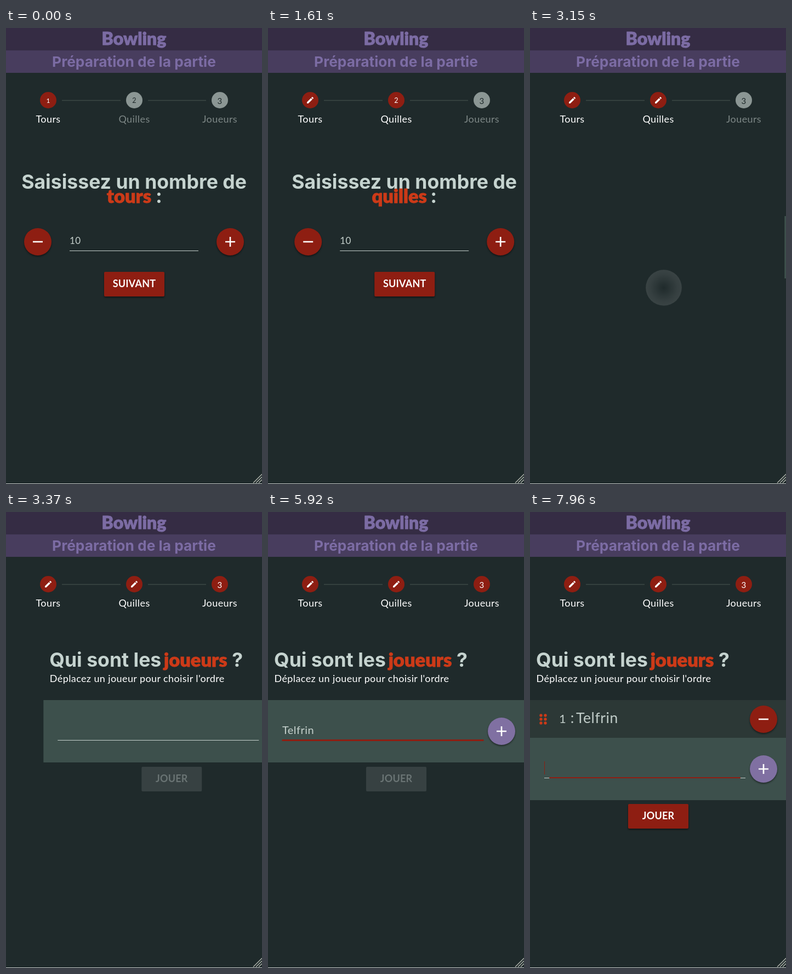
Recreate the animation shown at these times as an HTML page. Size 467x834 px, loop 8 s.

```html
<!DOCTYPE html>
<html lang="fr">
<head>
<meta charset="utf-8">
<title>Bowling</title>
<style>
  html, body { margin: 0; height: 100%; overflow: hidden; background: #1f2a2b; }
  svg { display: block; width: 100%; height: 100%; }
  text { font: 18px Lato, "Open Sans", sans-serif; letter-spacing: .022em; fill: #fff; white-space: pre; }
  .mid { text-anchor: middle; }
  .sub, .head { font-family: Inter, "Open Sans", sans-serif; font-weight: 700; letter-spacing: 0; }
  .sub { font-size: 26.3px; fill: #7c6ca4; }
  .head { font-size: 35.6px; fill: #c5d3cf; }
  .fun { font-size: 34.5px; font-weight: 900; letter-spacing: 0; fill: #cc3a18; stroke: #cc3a18; stroke-width: .8; }
  .title { font-size: 32px; fill: #7c6ca4; stroke: #7c6ca4; }
  .field { font-size: 20px; fill: #c5d0cc; }
  .count { font-size: 17px; fill: #c5d0cc; }
  .item { font-size: 26.5px; fill: #c0ccc8; }
  .btn { font-weight: 700; letter-spacing: .01em; }
  .raised { filter: drop-shadow(0 2px 1.5px #0007); }
</style>
</head>
<body>
<svg viewBox="0 0 467 834" preserveAspectRatio="none">
  <defs>
    <radialGradient id="glow">
      <stop offset="0" stop-color="#fff" stop-opacity="0"/>
      <stop offset=".75" stop-color="#fff" stop-opacity=".1"/>
      <stop offset="1" stop-color="#fff" stop-opacity=".12"/>
    </radialGradient>
  </defs>
  <rect width="467" height="834" fill="#1f2a2b"/>
  <g id="pages"></g>
  <rect width="467" height="41" fill="#352c44"/>
  <rect y="41" width="467" height="41" fill="#483d5e"/>
  <text class="fun title mid" x="233.5" y="30.5">Bowling</text>
  <text class="sub mid" x="233.5" y="71">Préparation de la partie</text>
  <path d="M102 132.5H209M259 132.5H365" stroke="#3c4746" stroke-width="1.5"/>
  <g id="steps"></g>
  <path d="M451 832L467 816M456 832L467 821M461 832L467 826" stroke="#b4b8b0" stroke-width="1.4"/>
  <rect y="833" width="467" height="1" fill="#c8cbcb"/>
  <circle id="touch" fill="url(#glow)"/>
</svg>
<script>
const RED = '#8e1e12', PURPLE = '#8070a2', NAME = 'Telfrin';
const $ = id => document.getElementById(id);
const set = (el, attrs) => { for (const k in attrs) el.setAttribute(k, attrs[k]); };
const show = (el, on) => { el.style.display = on ? '' : 'none'; };

const text = (cls, x, y, str, extra = '') => `<text class="${cls}" x="${x}" y="${y}" ${extra}>${str}</text>`;
const fab = (x, y, color, plus) => `<g transform="translate(${x} ${y})">
  <circle class="raised" r="25" fill="${color}"/>
  <path d="M-9 0H9${plus ? 'M0-9V9' : ''}" stroke="#fff" stroke-width="2.6"/></g>`;
const button = (y, label, id) => `<g id="${id}" transform="translate(179 ${y})">
  <rect class="raised" width="110" height="45" rx="2" fill="${RED}"/>
  ${text('btn mid', 55, 28, label)}</g>`;

const counterPage = (n, word, colonX) => `<g id="page${n}">
  ${text('head mid', 233.5, 294, 'Saisissez un nombre de')}
  ${text('fun mid', 224.5, 320, word)}${text('head mid', colonX, 320, ':')}
  ${fab(58, 391, RED)}${fab(409, 391, RED, true)}
  ${text('count', 116, 395, '10', `id="count${n}"`)}
  <rect x="116" y="407" width="235" height="1" fill="#c5d0cc"/>
  ${button(446, 'SUIVANT', 'next' + n)}</g>`;

const dots = [372, 379, 386].map(y =>
  `<circle cx="20" cy="${y}" r="2.7"/><circle cx="28" cy="${y}" r="2.7"/>`).join('');

const playersPage = `<g id="page3">
  ${text('head', 11, 283, 'Qui sont les')}${text('fun mid', 277.5, 283, 'joueurs')}
  ${text('head mid', 354, 283, '?')}
  ${text('', 11.5, 311, "Déplacez un joueur pour choisir l'ordre")}
  <g id="item">
    <rect y="344" width="467" height="69" fill="#2c3836"/>
    <g fill="#cc3a18">${dots}</g>
    ${text('item', 53, 386, '<tspan font-size="22">1</tspan> :')}${text('item', 84, 386, NAME)}
    ${fab(426, 379, RED)}
  </g>
  <g id="form">
    <rect y="344" width="467" height="114" fill="#3d504c"/>
    ${text('field', 26, 406, '', 'id="typed"')}
    <rect x="26" y="417" width="367" height="1" fill="#c5d0cc"/>
    <rect id="bar" y="416" fill="${RED}"/>
    <rect id="caret" y="387" width="1" height="24" fill="${RED}"/>
    ${fab(426, 401, PURPLE, true)}
  </g>
  ${button(466, 'JOUER', 'play')}</g>`;

$('pages').innerHTML = counterPage(1, 'tours', 279) + counterPage(2, 'quilles', 287) + playersPage;

const pencil = 'M3 17.25V21h3.75L17.81 9.94l-3.75-3.75zM20.71 7.04c.39-.39.39-1.02 0-1.41l-2.34-2.34c-.39-.39-1.02-.39-1.41 0l-1.83 1.83 3.75 3.75z';
// Old-style figures: the 1 and 2 stay at x-height, the 3 hangs below
$('steps').innerHTML = [[77, 'Tours', 12, 137], [234, 'Quilles', 12.5, 137], [390, 'Joueurs', 15, 139]]
  .map(([x, label, size, y], i) => `<g>
    <circle cx="${x}" cy="132" r="15"/>
    ${text('mid', x, y, i + 1, `style="font-size:${size}px"`)}
    <path d="${pencil}" fill="#fff" transform="translate(${x - 8} 124) scale(.667)"/>
    ${text('mid', x, 173, label)}</g>`).join('');

const clamp = v => Math.max(0, Math.min(1, v));
const mix = (a, b, k) => `rgb(${a.map((v, i) => Math.round(v + (b[i] - v) * k))})`;

function bezier(x1, y1, x2, y2) {
  const at = (a, b, s) => 3 * a * s * (1 - s) ** 2 + 3 * b * s * s * (1 - s) + s ** 3;
  return x => {
    let lo = 0, hi = 1;
    for (let i = 0; i < 24; i++) {
      const m = (lo + hi) / 2;
      if (at(x1, x2, m) < x) lo = m; else hi = m;
    }
    return at(y1, y2, (lo + hi) / 2);
  };
}
const slideEase = bezier(.35, 0, .25, 1), barEase = bezier(.25, .8, .25, 1);

const SLIDE2 = 1330, SLIDE3 = 3133, MINUS = 2480, ADD = 7150, REFOCUS = 7835;
const keys = [4770, 4920, 5230, 5280, 5460, 5600, 5690];
const caretOn = [[3930, 4410], [4770, 5920], [6480, 6990], [REFOCUS, 8000]];
const taps = [[1280, 240, 475], [2350, 70, 398], [3000, 244, 475],
              [3800, 225, 397], [6990, 424, 395], [7700, 401, 475]];

const pageAt = t => (t >= SLIDE2) + (t >= SLIDE3);

function drawSteps(t) {
  const current = pageAt(t), lit = pageAt(t - 30); // the disc lights up just after the slide starts
  [...$('steps').children].forEach((g, i) => {
    const [disc, digit, pen, label] = g.children, on = i <= lit;
    set(disc, { fill: on ? RED : '#8b9694' });
    digit.style.fill = on ? '#fff' : '#1f2a2b';
    label.style.fill = on ? '#fff' : '#7d8786';
    show(digit, i >= current);
    show(pen, i < current);
  });
}

function drawPages(t) {
  const current = pageAt(t);
  for (let i = 0; i < 3; i++) show($('page' + (i + 1)), i === current);
  const slide = (start, length) => `translate(${467 * (1 - slideEase(clamp((t - start) / length)))} 0)`;
  set($('page2'), { transform: slide(SLIDE2, 358) });
  set($('page3'), { transform: slide(SLIDE3, 405) });

  const less = t >= MINUS, count = $('count2');
  count.textContent = less ? '9' : '10';
  count.style.fontSize = less ? '20px' : '';
  set(count, { y: less ? 399 : 395 });
}

function drawForm(t) {
  const added = t >= ADD;
  show($('item'), added);
  set($('form'), { transform: `translate(0 ${added ? 69 : 0})` });
  set($('play'), { transform: `translate(179 ${added ? 534 : 466})` });

  const typed = $('typed');
  typed.textContent = added ? '' : NAME.slice(0, keys.filter(k => t >= k).length);
  const end = typed.textContent ? typed.getComputedTextLength() : 0;
  set($('caret'), { x: 26 + Math.round(end) });
  show($('caret'), caretOn.some(([a, b]) => t >= a && t < b));

  const focus = t >= REFOCUS ? REFOCUS : 3958;
  const k = barEase(clamp((t - focus) / 300)), half = 184 * (.5 + k / 2);
  const fading = added && t < REFOCUS;
  set($('bar'), {
    x: 209.5 - half, width: 2 * half, height: k < .97 ? 2 : 3,
    opacity: t < focus ? 0 : fading ? 1 - clamp((t - ADD) / 300) : 1
  });

  const lit = clamp((t - ADD) / 300), [box, label] = $('play').children;
  set(box, { fill: mix([55, 65, 66], [142, 30, 18], lit) });
  box.style.filter = added ? '' : 'none';
  label.style.fill = mix([106, 116, 116], [255, 255, 255], lit);
}

function drawTouch(t) {
  const tap = taps.find(([start]) => t >= start && t < start + 180);
  show($('touch'), tap);
  if (!tap) return;
  const [start, cx, cy] = tap, age = t - start;
  const r = 37 * clamp(.5 + age / 120) - Math.max(0, age - 130) / 5;
  set($('touch'), { cx, cy, r });
}

function frame(now) {
  const t = now % 8000;
  drawSteps(t);
  drawPages(t);
  drawForm(t);
  drawTouch(t);
  requestAnimationFrame(frame);
}
frame(0);
</script>
</body>
</html>
```
